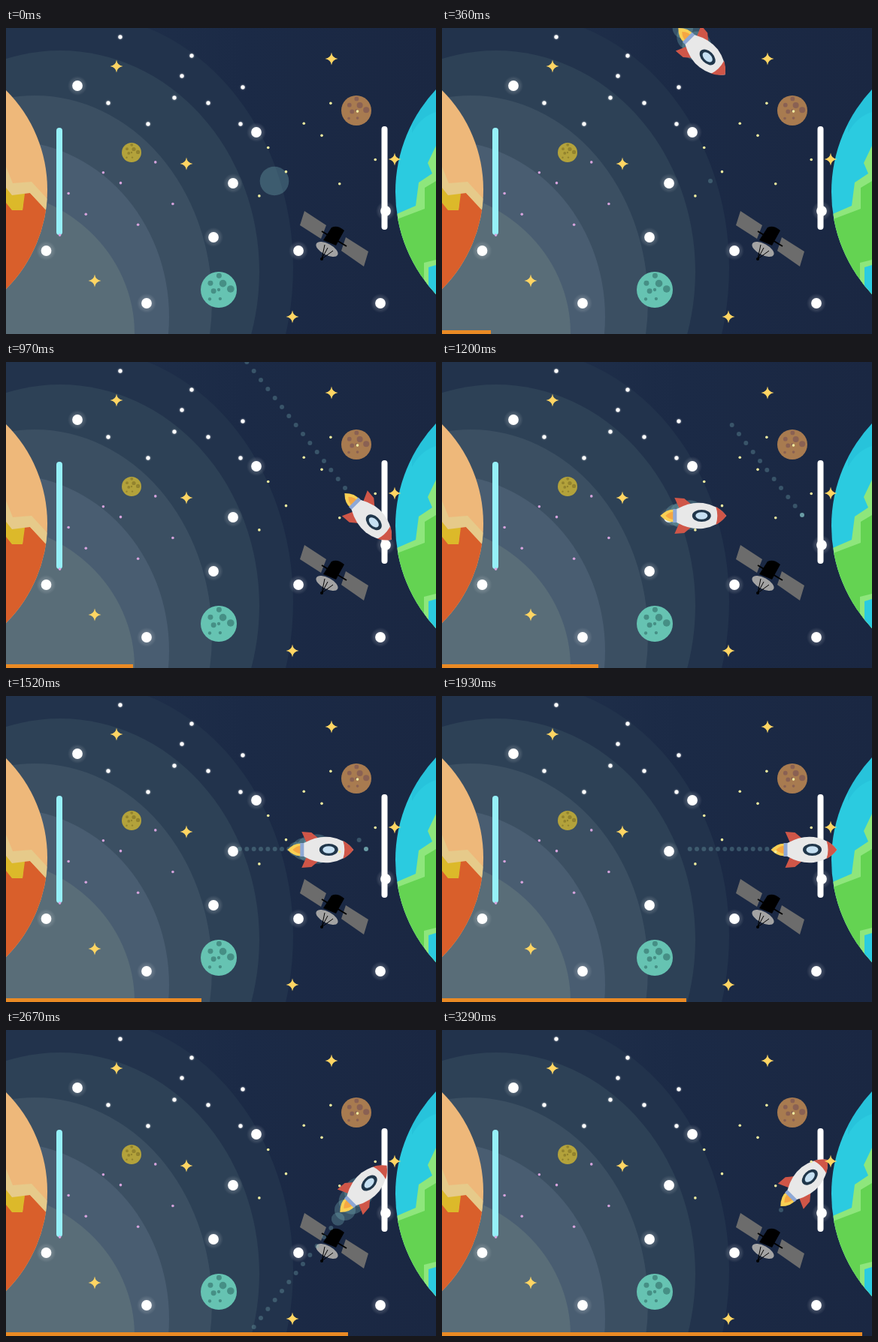
These frames come from a looping animation (572x408 px, 3.37 s). An HTML page:

```html
<!DOCTYPE html>
<html lang="en">
<head>
<meta charset="utf-8">
<title>Rocket between planets</title>
<style>
  html, body { margin: 0; width: 100%; height: 100%; overflow: hidden; background: #1a2842; }
  svg { display: block; width: 100%; height: 100%; }
</style>
</head>
<body>
<svg viewBox="0 0 572 408" xmlns="http://www.w3.org/2000/svg">
  <defs>
    <linearGradient id="sky">
      <stop offset="0" stop-color="#22334d"/>
      <stop offset=".55" stop-color="#1b2a46"/>
      <stop offset="1" stop-color="#1a2742"/>
    </linearGradient>
    <radialGradient id="glow">
      <stop offset=".45" stop-color="#fff" stop-opacity=".2"/>
      <stop offset="1" stop-color="#fff" stop-opacity="0"/>
    </radialGradient>
    <clipPath id="marsClip"><circle cx="-132" cy="215.5" r="187"/></clipPath>
    <clipPath id="earthClip"><circle cx="717.5" cy="218.5" r="199.5"/></clipPath>
  </defs>

  <rect width="572" height="408" fill="url(#sky)"/>
  <ellipse cx="97" cy="320" rx="285" ry="338" fill="#22334c"/>
  <ellipse cx="72" cy="325" rx="265" ry="295" fill="#2d4156"/>
  <ellipse cx="38" cy="365" rx="236" ry="275" fill="#3b4f62"/>
  <ellipse cx="0" cy="385" rx="217" ry="235" fill="#495d71"/>
  <ellipse cx="-35" cy="407" rx="206" ry="193" fill="#596d78"/>

  <g clip-path="url(#marsClip)">
    <rect y="20" width="60" height="380" fill="#eeb87a"/>
    <path d="M0 232L8 242H22L24 220H32L56 245V400H0Z" fill="#d95f2b"/>
    <path d="M0 212L8 221H25L22 243H8L0 233Z" fill="#dcb92a"/>
    <path d="M0 185L9 207L34 205L56 229V246L32 220L8 223L0 213Z" fill="#e6ca8a"/>
  </g>
  <g clip-path="url(#earthClip)">
    <rect x="515" y="15" width="60" height="390" fill="#2bcbe0"/>
    <path d="M540 140Q552 118 572 112V80H540Z" fill="#22b6d2" opacity=".4"/>
    <path d="M515 250L545 237L549 206L567 194L561 180L572 157V400H515Z" fill="#8ee67c"/>
    <path d="M515 257L557 241L557 213L572 204V400H515Z" fill="#64d352"/>
    <path d="M556 345V313L572 309V400Z" fill="#8ee67c"/>
    <path d="M562 350V319L572 316V400Z" fill="#2bcbe0"/>
  </g>

  <rect x="67" y="133" width="8" height="143" rx="4" fill="#96f0f8"/>
  <rect x="499.5" y="131" width="8" height="138" rx="4" fill="#fff"/>
  <g id="planets"></g>
  <g id="bigStars"></g>

  <g id="satellite">
    <path d="M397 244L426 263L419 281L391 263ZM452 279L482 298L476 318L446 297Z" fill="#6c6c6c"/>
    <path d="M420 271L453 291" stroke="#000" stroke-width="2"/>
    <path d="M433 266Q441 262 450 270L439 290L422 283Z" fill="#000"/>
    <ellipse cx="427" cy="295" rx="16" ry="7.5" transform="rotate(28 427 295)" fill="#a3a3a3"/>
    <path d="M420 308L424 289M420 308L428 293M420 308L435 297" stroke="#000" fill="none"/>
    <circle cx="420" cy="308" r="2" fill="#000"/>
  </g>
  <g id="smoke" fill="#78b0b6"></g>

  <g id="rocket">
    <path d="M-44 0Q-34 -10 -24 -8V8Q-34 10 -44 0Z" fill="#f9d054"/>
    <path d="M-37 0Q-31 -6 -24 -5V5Q-31 6 -37 0Z" fill="#f5a742"/>
    <path d="M-25 -24L-12 -23L0 -13L-17 -6ZM-25 24L-12 23L0 13L-17 6Z" fill="#cf5648"/>
    <rect x="-27" y="-9" width="8" height="18" fill="#8ea8d6"/>
    <path d="M-22 -9Q-4 -19 13 -17Q33 -14 44 0Q33 14 13 17Q-4 19 -22 9Z" fill="#e8e8e8"/>
    <path d="M30 -12Q38 -8 44 0Q38 8 30 12Q34 0 30 -12Z" fill="#cf5648"/>
    <ellipse cx="11" rx="12.5" ry="8" fill="#20364a"/>
    <ellipse cx="11" rx="8" ry="4.8" fill="#c6e0f2"/>
  </g>

  <g id="stars"></g>
  <rect id="bar" y="403" width="0" height="5" fill="#ea8a24"/>
</svg>

<script>
const $ = id => document.getElementById(id);
const disc = (x, y, r, fill) => `<circle cx="${x}" cy="${y}" r="${r}" fill="${fill}"/>`;
const discs = (pts, r, fill) => pts.map(([x, y]) => disc(x, y, r, fill)).join('');
const range = n => [...Array(n).keys()];

// craters wind outwards by the golden angle
function planet(x, y, r, fill, spot) {
  return disc(x, y, r, fill) + range(8).map(i => {
    const d = r * .78 * Math.sqrt(i / 7), a = i * 2.4 + .5;
    return disc(x + d * Math.cos(a), y + d * Math.sin(a), r * (.09 + .055 * (i % 3)), spot);
  }).join('');
}
$('planets').innerHTML = planet(167, 166, 13, '#b3a23b', '#93832e') +
  planet(466, 110, 20, '#a87b50', '#8a6153') +
  planet(283, 349, 24, '#66c3b2', '#468f85');

// evenly spread points in a box, from a Halton sequence
function halton(i, base) {
  let v = 0;
  for (let f = 1 / base; i > 0; i = Math.floor(i / base), f /= base) v += f * (i % base);
  return v;
}
const scatter = (n, x, y, w, h) =>
  range(n).map(i => [x + w * halton(i + 1, 2), y + h * halton(i + 1, 3)]);

const big = [[95, 77], [333, 139], [302, 207], [276, 279], [53.5, 297], [389, 297],
  [187, 367], [498, 367], [505, 244]];
const small = [[152, 12], [247, 37], [234, 64], [315, 79], [136, 100], [224, 93],
  [189, 128], [269, 100], [312, 128]];
const sparks = [[147, 51], [433, 41], [240, 181], [118, 337], [381, 385], [517, 175]];

$('bigStars').innerHTML = discs(big, 13, 'url(#glow)') + discs(big, 6.9, '#fff');
$('stars').innerHTML = discs(small, 5, 'url(#glow)') + discs(small, 2.7, '#fff') +
  discs(scatter(9, 325, 95, 190, 145), 1.8, '#f2efa0') +
  discs(scatter(8, 60, 165, 185, 125), 1.8, '#d5a3dc') +
  sparks.map(([x, y]) => `<path transform="translate(${x} ${y})" fill="#ffd563"
    d="M0 -8.5Q1 -1 8.5 0Q1 1 0 8.5Q-1 1 -8.5 0Q-1 -1 0 -8.5Z"/>`).join('');

// Each flight leaves from x = START, heads for END and rests there until it is hidden.
const START = 311, END = 479, HUB = 204, SPEED = 21, LAG = .15, DOTS = 18, LIFE = 9.27;
const flights = [[3.33, 14], [14.86, 27], [27.14, 44]]
  .map(([start, hide], i) => ({ start, hide, turn: 1 - i }));
const pathY = (f, x) => HUB - (END - x) * 1.285 * f.turn;

const puffs = [];
function addPuff(x, y, born, alpha = .32) {
  const el = document.createElementNS('http://www.w3.org/2000/svg', 'circle');
  el.setAttribute('cx', x);
  el.setAttribute('cy', y);
  $('smoke').append(el);
  puffs.push({ el, born, alpha });
}
addPuff(357, HUB, -.4);
for (const f of flights) {
  for (let i = 0; i <= DOTS; i++) {
    const d = (END - START) * i / DOTS;
    addPuff(START + d, pathY(f, START + d), f.start + d / SPEED, i < DOTS ? .32 : .85);
  }
}

const LOOP = 3370, STEPS = 44, LEAD = 26;
const stepAt = ms => Math.min(STEPS - 1, Math.floor((ms + LEAD) * STEPS / LOOP));

function draw(step) {
  $('bar').setAttribute('width', step * 13);
  const f = flights.find(f => step >= f.start && step < f.hide);
  $('rocket').style.display = f ? '' : 'none';
  if (f) {
    const x = Math.min(END, START + (step - f.start - LAG) * SPEED);
    $('rocket').setAttribute('transform',
      `translate(${x + 2.5} ${pathY(f, x) + 1 + f.turn}) rotate(${45 * f.turn})`);
  }
  for (const p of puffs) {
    const age = step - p.born;
    const alive = age >= 0 && age < LIFE;
    const r = Math.max(3, 20 - 4.2 * age * age);
    p.el.setAttribute('r', alive ? r : 0);
    p.el.setAttribute('opacity', r > 3 ? .32 : p.alpha);
  }
}

const t0 = performance.now();
let shown = -1;
function tick(now) {
  const step = stepAt(Math.max(0, now - t0) % LOOP);
  if (step !== shown) draw(shown = step);
  requestAnimationFrame(tick);
}
draw(0);
requestAnimationFrame(tick);
</script>
</body>
</html>
```
